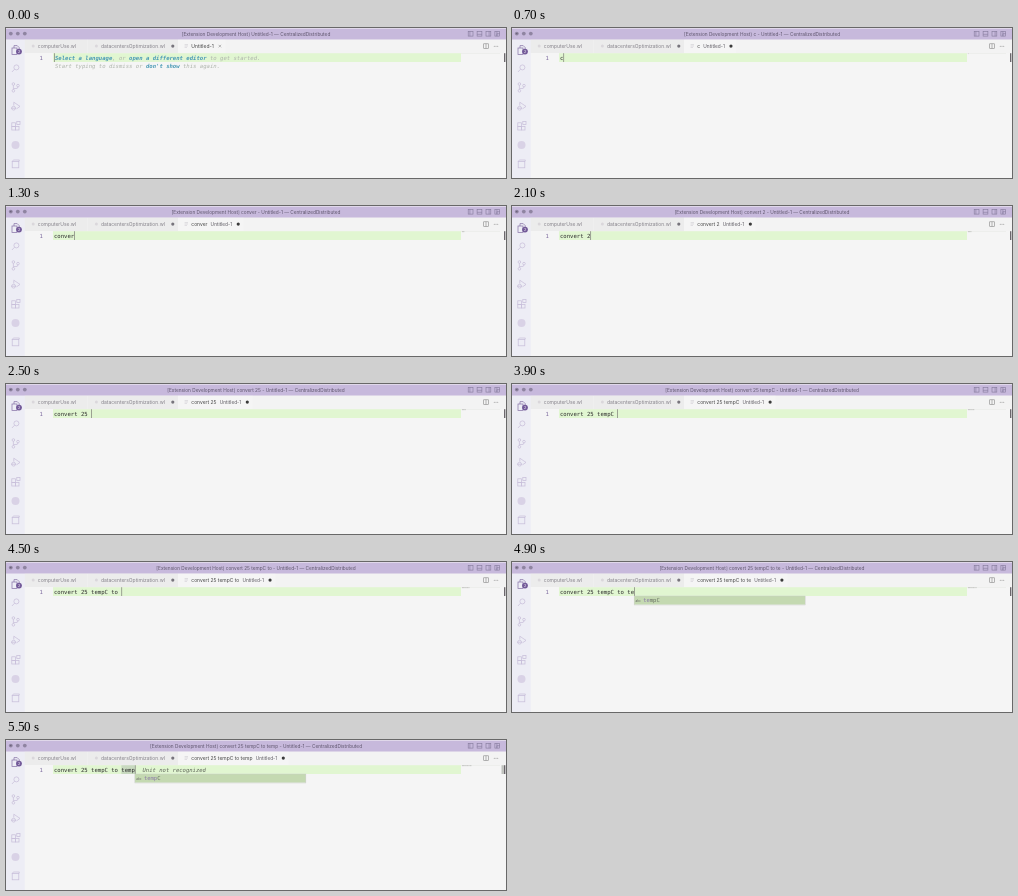
An HTML page with a canvas that plays this animation: 500 px wide and 150 px high, repeating every 5.7 s.

```html
<!DOCTYPE html>
<html lang="en">
<head>
<meta charset="utf-8">
<title>Typing a unit conversion</title>
<style>
  html, body { margin: 0; width: 100%; height: 100%; overflow: hidden; background: #f5f5f5; }
  canvas { display: block; width: 500px; height: 150px; }
</style>
</head>
<body>
<canvas id="stage"></canvas>
<script>
const W = 500, H = 150, LOOP = 5700;
const UI = 'Inter, "Open Sans", sans-serif';
const MONO = '"DejaVu Sans Mono", "Noto Sans Mono", monospace';
const CODE_X = 48, CHAR = 3.37, CODE_SIZE = 5.6, LINE_Y = 25.2, LINE_H = 8.8;
const MAP_X = 455;
const PURPLE = '#8a77a9', ICON = '#c8bfda', CONTROL = '#83789a';
const FULL = 'convert 25 tempC to temp';

// time, typed characters, extra state
const steps = [
  [0, 0, { cursor: true }],
  [270, 0, {}],
  [700, 1, { cursor: true }],
  [900, 3, { cursor: true }],
  [1100, 4, { cursor: true }],
  [1300, 6, { cursor: true }],
  [1500, 8, { cursor: true }],
  [1700, 8, {}],
  [2100, 9, { cursor: true }],
  [2300, 9, { cursor: true, mark: true }],
  [2500, 11, { cursor: true }],
  [2700, 12, { cursor: true }],
  [3100, 13, { cursor: true }],
  [3300, 16, { cursor: true }],
  [3700, 16, { cursor: true, mark: true, word: 11 }],
  [3900, 17, { cursor: true }],
  [4300, 18, { cursor: true, list: ['tempC'], match: 1 }],
  [4500, 20, { cursor: true }],
  [4700, 21, { cursor: true, list: ['tempC', 'to'], match: 1 }],
  [4900, 22, { cursor: true, list: ['tempC'], match: 2 }],
  [5100, 24, { cursor: true, list: ['tempC'], match: 4 }],
  [5500, 24, { cursor: true, list: ['tempC'], match: 4, mark: true, word: 20, hint: 'Unit not recognized' }]
];

const canvas = document.getElementById('stage');
const ratio = window.devicePixelRatio || 1;
canvas.width = W * ratio;
canvas.height = H * ratio;
const ctx = canvas.getContext('2d');
ctx.scale(ratio, ratio);

function rect(x, y, w, h, color) {
  ctx.fillStyle = color;
  ctx.fillRect(x, y, w, h);
}

function disc(x, y, r, color) {
  ctx.fillStyle = color;
  ctx.beginPath();
  ctx.arc(x, y, r, 0, Math.PI * 2);
  ctx.fill();
}

function ring(x, y, r, color) {
  ctx.strokeStyle = color;
  ctx.beginPath();
  ctx.arc(x, y, r, 0, Math.PI * 2);
  ctx.stroke();
}

function line(color, ...pts) {
  ctx.strokeStyle = color;
  ctx.beginPath();
  for (let i = 0; i < pts.length; i += 2) ctx.lineTo(pts[i], pts[i + 1]);
  ctx.stroke();
}

function box(x, y, w, h, color) {
  ctx.strokeStyle = color;
  ctx.strokeRect(x, y, w, h);
}

// Draws text and returns the x where it ends
function text(str, x, y, font, color, align = 'left') {
  ctx.font = font;
  ctx.fillStyle = color;
  ctx.textAlign = align;
  ctx.fillText(str, x, y);
  return x + ctx.measureText(str).width;
}

function titleBar(typed) {
  rect(0, 0, W, 11.4, '#c7b9dc');
  rect(0, 0, W, 0.8, '#e6e0ee');
  for (let i = 0; i < 3; i++) disc(4.8 + i * 7, 5.6, 1.9, '#8f84a1');
  if (typed) disc(4.8, 5.6, 0.7, '#5f566e');
  const name = typed ? typed.trim() + ' - Untitled-1' : 'Untitled-1';
  text('[Extension Development Host] ' + name + ' — CentralizedDistributed',
    250, 7.5, '4.76px ' + UI, '#5d546b', 'center');

  ctx.lineWidth = 0.6;
  for (let i = 0; i < 4; i++) {
    const x = 462.2 + i * 8.9;
    box(x, 3.3, 4.8, 4.8, CONTROL);
    if (i === 0) line(CONTROL, x + 1.7, 3.3, x + 1.7, 8.1);
    if (i === 1) line(CONTROL, x, 6.3, x + 4.8, 6.3);
    if (i === 2) line(CONTROL, x + 3.1, 3.3, x + 3.1, 8.1);
    if (i === 3) line(CONTROL, x + 2, 3.3, x + 2, 8.1, x + 2, 5.7, x + 4.8, 5.7);
  }
}

function tabBar(typed) {
  const font = '4.96px ' + UI, small = '4.75px ' + UI, base = 19.9;
  rect(18.6, 11.4, W - 18.6, 13.6, '#f3f3f3');
  rect(18.6, 11.4, 62.8, 13.6, '#ececec');
  rect(81.8, 11.4, 90.2, 13.6, '#ececec');

  disc(27.2, 18, 1.5, '#dad7db');
  text('computerUse.wl', 31.8, base, font, '#85828a');
  disc(90.4, 18, 1.5, '#dad7db');
  text('datacentersOptimization.wl', 95, base, font, '#85828a');
  disc(166.8, 18.1, 1.6, '#77747c');

  const x = 185.3;
  const label = typed ? typed.trim() : 'Untitled-1';
  ctx.font = font;
  let end = x + ctx.measureText(label).width;
  if (typed) {
    ctx.font = small;
    end += 3.2 + ctx.measureText('Untitled-1').width;
  }
  rect(172.2, 11.4, end + 11.5 - 172.2, 13.6, '#f5f5f5');
  ctx.lineWidth = 0.5;
  [16.6, 18, 19.4].forEach((y, i) => line('#c4c1c8', 178.6, y, i === 2 ? 181 : 182, y));
  const after = text(label, x, base, font, '#444');
  if (typed) {
    text('Untitled-1', after + 3.2, base, small, '#5c5961');
    disc(end + 6.1, 18.1, 1.6, '#3a3a3a');
  } else {
    line('#777', end + 4.8, 16.8, end + 7.4, 19.4);
    line('#777', end + 4.8, 19.4, end + 7.4, 16.8);
  }

  ctx.lineWidth = 0.6;
  box(477.7, 15.8, 4.6, 4.6, '#888');
  line('#888', 480, 15.8, 480, 20.4);
  [488.2, 490, 491.8].forEach(dx => disc(dx, 18.3, 0.45, '#666'));
}

function activityBar() {
  rect(0, 11.4, 18.6, H, '#ededf5');
  ctx.lineWidth = 0.75;

  // files
  box(6, 20, 5, 6.4, PURPLE);
  line(PURPLE, 8, 20, 8, 17.6, 11.2, 17.6, 13.2, 19.6, 13.2, 24.4, 11, 24.4);
  disc(13, 23.6, 2.9, '#735a99');
  text('2', 13, 24.9, '3.6px ' + UI, '#fff', 'center');

  // search
  ring(10.4, 39.4, 2.5, ICON);
  line(ICON, 8.6, 41.2, 5.9, 44);

  // source control
  ring(7.4, 56, 1.3, ICON);
  ring(7.4, 62.8, 1.3, ICON);
  ring(12, 57.6, 1.3, ICON);
  line(ICON, 7.4, 57.3, 7.4, 61.5);
  line(ICON, 12, 58.9, 11.2, 60.4, 7.6, 60.6);

  // run and debug
  line(ICON, 7.8, 77.5, 7.8, 74.2, 14, 78.4, 10.6, 80.8);
  ring(7.6, 80.2, 1.9, ICON);
  line(ICON, 5, 80.2, 10.2, 80.2);

  // extensions
  box(5.8, 94.8, 3.6, 3.6, ICON);
  box(5.8, 98.4, 3.6, 3.6, ICON);
  box(9.4, 98.4, 3.6, 3.6, ICON);
  box(10.8, 93.4, 3.2, 3.2, ICON);

  disc(9.5, 117, 4, '#d9d2e6');

  // notebook
  box(6.2, 133.6, 6.6, 6.2, ICON);
  line(ICON, 6.2, 133.6, 7.4, 132, 13.4, 132, 12.8, 133.6);
}

function welcome() {
  const font = 'italic 5.6px ' + MONO, link = 'italic bold 5.6px ' + MONO;
  const rows = [
    ['*Select a language', ', or ', '*open a different editor', ' to get started.'],
    ['Start typing to dismiss or ', "*don't show", ' this again.']
  ];
  rows.forEach((row, i) => {
    let x = 49;
    for (const part of row) {
      const isLink = part[0] === '*';
      x = text(isLink ? part.slice(1) : part, x, 31.7 + i * 8.6,
        isLink ? link : font, isLink ? '#4a9ab5' : '#adb3aa');
    }
  });
}

function popup(x, items, match) {
  const y = LINE_Y + LINE_H, w = 171, h = items.length * 8.6;
  rect(x, y, w, h + 0.4, '#f5f5f5');
  rect(x, y, w, 8.6, '#c4d9b1');
  ctx.lineWidth = 0.4;
  box(x, y, w, h + 0.4, '#c8c8c8');
  items.forEach((item, i) => {
    const base = y + 6.3 + i * 8.6;
    text('abc', x + 1.4, base - 0.4, '3px ' + UI, '#666');
    const next = text(item.slice(0, match), x + 9, base, '5.5px ' + MONO, '#8a79a6');
    text(item.slice(match), next, base, '5.5px ' + MONO, '#677062');
  });
}

function minimap(typed) {
  rect(MAP_X, LINE_Y, 39, 0.5, '#e4e6e2');
  [...typed].forEach((c, i) => {
    if (c !== ' ') rect(MAP_X + 1 + i * 0.39, LINE_Y + 0.2, 0.39, 0.7, '#a9aca7');
  });
}

function editor(typed, state) {
  const cursorX = CODE_X + typed.length * CHAR, base = 31.7;
  const font = CODE_SIZE + 'px ' + MONO;
  rect(18.6, 25, W - 18.6, H - 25, '#f5f5f5');
  rect(47, LINE_Y, MAP_X - 47, LINE_H, '#e1f6d1');
  minimap(typed);
  text('1', 35.3, base, font, '#7d6a9e', 'center');

  if (state.word) {
    const wordX = CODE_X + state.word * CHAR;
    rect(wordX, LINE_Y, cursorX - wordX, LINE_H, 'rgba(87,87,110,.18)');
  }
  if (typed) text(typed, CODE_X, base, font, '#2b2b2b');
  else welcome();
  if (state.hint) text(state.hint, 136.5, base, 'italic 5.55px ' + MONO, '#5d6358');
  if (state.cursor) rect(cursorX, LINE_Y, 0.7, LINE_H, '#7d7d78');

  if (state.mark) rect(495.5, LINE_Y, 2.4, LINE_H, '#bfc1bd');
  rect(498.2, LINE_Y, 1.1, LINE_H, '#4b464c');
  if (state.list) popup(cursorX, state.list, state.match);
}

function draw(now) {
  const t = now % LOOP;
  const [, count, state] = steps.findLast(s => s[0] <= t);
  const typed = FULL.slice(0, count);
  editor(typed, state);
  tabBar(typed);
  activityBar();
  titleBar(typed);
}

const start = performance.now();
function tick() {
  draw(performance.now() - start);
  requestAnimationFrame(tick);
}
tick();
</script>
</body>
</html>
```
